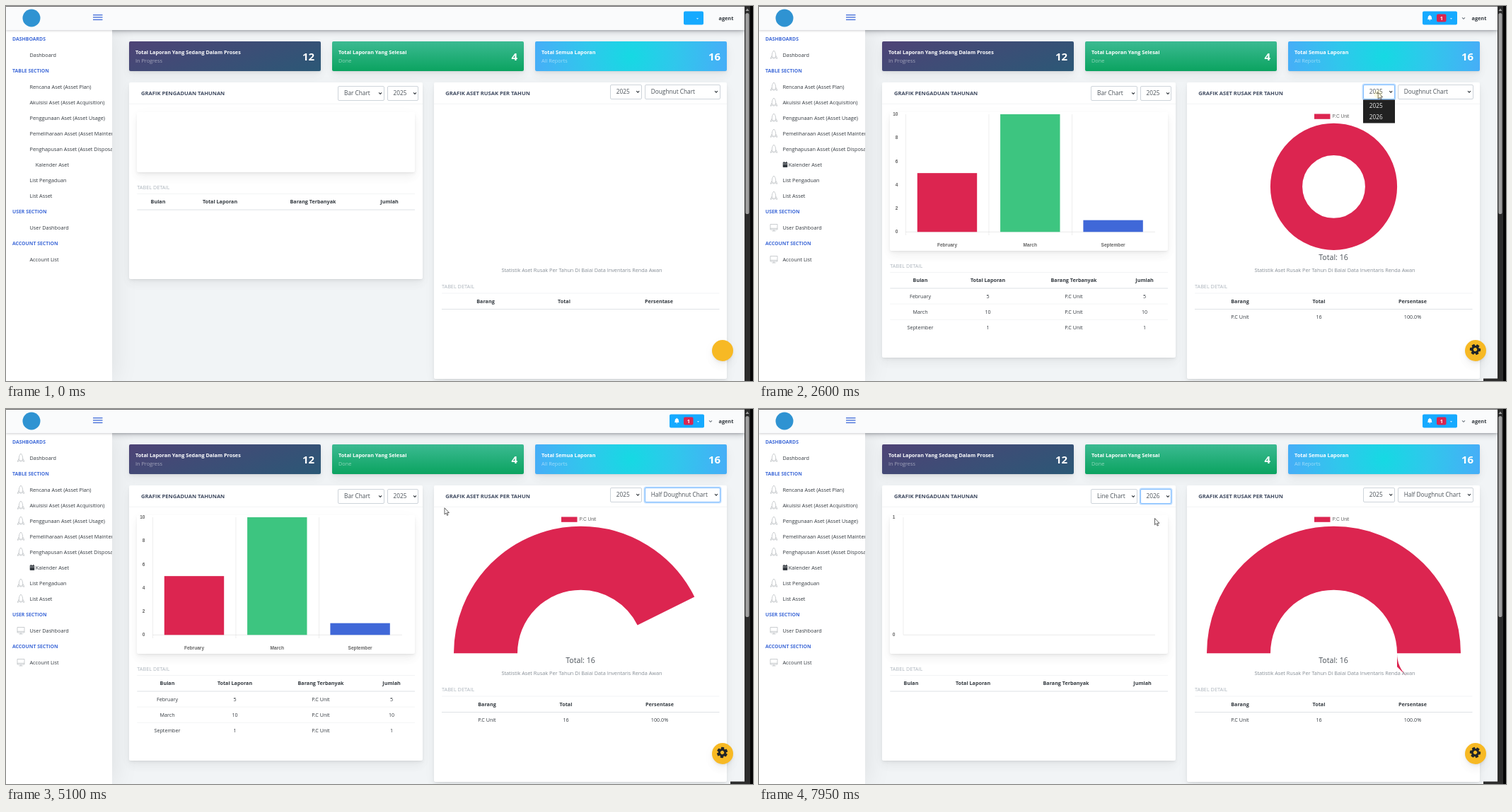
An HTML page that plays this animation: 1056x530 px, repeating every 8000 ms.

```html
<!DOCTYPE html>
<html lang="id">
<head>
<meta charset="utf-8">
<title>Dashboard</title>
<style>
html { font-size: 8.8px; }
html, body { margin: 0; width: 1056px; height: 530px; overflow: hidden; background: #f1f4f6; }
#stage { position: relative; width: 1056px; height: 530px; overflow: hidden; }
#stage div { position: absolute; box-sizing: border-box; }
#stage > svg { position: absolute; left: 0; top: 0; }
.shadow { box-shadow: 0 .47rem 2.19rem rgba(4,9,20,.03), 0 .94rem 1.4rem rgba(4,9,20,.03),
  0 .25rem .53rem rgba(4,9,20,.05), 0 .125rem .19rem rgba(4,9,20,.03); }
.card { background: #fff; border-radius: 2px; }
.select { background: #fff; border: .6px solid #ced4da; border-radius: 2px; }
.focus { border-color: #80bdff; box-shadow: 0 0 0 1.5px rgba(0,123,255,.25); }
text { font: 7.3px 'Open Sans', 'Noto Sans', sans-serif; fill: #343a40; white-space: pre; }
.bold { font-weight: 700; }
.mid { text-anchor: middle; }
.end { text-anchor: end; }
.white { fill: #fff; }
.faint { fill: #fff; opacity: .5; }
.gray { fill: #868e96; }
.pale { fill: #adb5bd; }
.nav { font-size: 6.9px; font-weight: 700; fill: #3f6ad8; }
.title { font-size: 7.6px; font-weight: 700; fill: #3f4a60; }
.cell { font-size: 7.2px; text-anchor: middle; }
.field { font-size: 8.3px; fill: #495057; }
.option { font-size: 8.3px; fill: #eee; }
.number { font-size: 15px; font-weight: 700; fill: #fff; text-anchor: end; }
.total { font-size: 10.6px; fill: #495057; text-anchor: middle; }
.tick, .legend { font: 6.6px 'Liberation Sans', Arial, sans-serif; fill: #666; }
.tick { font-weight: 700; }
</style>
</head>
<body>
<div id="stage"></div>
<script>
const LOOP = 8000, RED = '#dc2550', GREEN = '#3dc580', BLUE = '#4068d8';
const ICONS_AT = 380, LAYOUT_AT = 480, DATA_AT = 650, BADGE_AT = 1850;
const PIE_AT = 3740, HALF_AT = 4720, LINE_AT = 6515, CLEAR_AT = 7810;

// [time, x, y] of the pointer tip
const POINTER = [[1150, 770, 318], [1500, 790, 300], [1740, 815, 265], [1940, 815, 265],
  [2350, 874, 122], [2800, 876, 122], [3000, 945, 122], [3300, 945, 122], [3500, 944, 139],
  [3720, 944, 139], [3950, 943, 121], [4200, 941, 122], [4480, 939, 168], [4660, 939, 168],
  [5240, 566, 135], [5600, 498, 122], [5900, 498, 122], [6150, 499, 155], [6380, 499, 155],
  [6680, 559, 122], [7100, 559, 122], [7350, 559.5, 154.5]];
const TOOLTIP = [[1250, 0], [1500, 1], [1620, 1], [1860, 0], [2020, 0], [2150, .8], [2250, .8], [2500, 0]];
const CLICKS = [2400, 2800, 3060, 3560, 4080, 4560, 5660, 6340, 6940, 7680];
const YEARS = ['2025', '2026'], KINDS = ['Pie Chart', 'Doughnut Chart', 'Half Doughnut Chart'];
// [open, close, x, y, width, options]
const MENUS = [[2420, 2820, 854, 132.5, 45, YEARS], [3080, 3600, 903, 132.5, 107, KINDS],
  [4100, 4600, 903, 132.5, 107, KINDS], [5700, 6380, 469, 134, 65, ['Bar Chart', 'Line Chart']],
  [6960, 7720, 539, 134, 45, YEARS]];
const MONTHS = [['February', 5, RED], ['March', 10, GREEN], ['September', 1, BLUE]];
const BASE = 319.3, UNIT = 16.63;

const clamp = v => Math.max(0, Math.min(1, v));
const easeOut = (t, start) => 1 - (1 - clamp((t - start) / 1000)) ** 4;

function track(keys, t) {
  let i = 0;
  while (i < keys.length - 2 && t >= keys[i + 1][0]) i++;
  const [a, b] = [keys[i], keys[i + 1]];
  const k = clamp((t - a[0]) / (b[0] - a[0])), s = k * k * (3 - 2 * k);
  return a.slice(1).map((v, n) => v + (b[n + 1] - v) * s);
}

const text = (x, y, s, cls = '') => `<text x="${x}" y="${y}" dy=".36em" class="${cls}">${s}</text>`;
const rect = (x, y, w, h, fill, more = '') =>
  `<rect x="${x}" y="${y}" width="${w}" height="${h}" fill="${fill}" ${more}/>`;
const path = (d, stroke, width = 1, fill = 'none', more = '') =>
  `<path d="${d}" stroke="${stroke}" stroke-width="${width}" fill="${fill}" ${more}/>`;
const rule = (x1, x2, y, color = '#e9ecef', width = .6) => path(`M${x1} ${y}H${x2}`, color, width);
const at = (x, y, s) => `<g transform="translate(${x} ${y})">${s}</g>`;
const box = (x, y, w, h, cls, style = '') =>
  `<div class="${cls}" style="left:${x}px;top:${y}px;width:${w}px;height:${h}px;${style}"></div>`;

const ROCKET = path('M0-6C3-3 3 1 2.2 4H-2.2C-3 1-3-3 0-6ZM2.5 1L4.5 4V5.5L2 4M-2.5 1L-4.5 4V5.5L-2 4M0 4V6', '#b5b9bd', .7);
const MONITOR = path('M-5-4.5H5V3H-5ZM-5 1.3H5M-2.5 5H2.5M0 3V5', '#b5b9bd', .7);
const CALENDAR = rect(-3.3, -3, 6.6, 7, '#343a40', 'rx=".7"') + rule(-3.3, 3.3, -.9, '#fff', .6) +
  path('M-1.6-4.2V-2.5M1.6-4.2V-2.5', '#343a40', 1);
const BELL = path('M0-4.2C.5-4.2.6-3.9.6-3.6 2.2-3.2 2.6-2 2.6-.6 2.6 1 3 1.4 3.4 2H-3.4C-3 1.4-2.6 1-2.6-.6-2.6-2-2.2-3.2-.6-3.6-.6-3.9-.5-4.2 0-4.2ZM-1 2.6H1A1 1 0 0 1-1 2.6Z', 'none', 0, '#fff');
const ARROW = path('M0 0V9.2L2.1 7.3 3.6 10.6 5 10 3.6 6.8H6.4Z', '#222', .7, '#fff');
const chevron = (x, y, color = '#343a40') => path(`M${x - 2} ${y - 1}l2 2 2-2`, color, 1.1);

function sidebar(icons) {
  const items = ['Rencana Aset (Asset Plan)', 'Akuisisi Aset (Asset Acquisition)', 'Penggunaan Aset (Asset Usage)',
    'Pemeliharaan Asset (Asset Maintenance)', 'Penghapusan Asset (Asset Disposal)', 'Kalender Aset',
    'List Pengaduan', 'List Asset'];
  const entry = (y, label, icon) => text(33.5, y, label) + (icons ? at(21, y, icon) : '');
  return '<svg width="150" height="530">' +
    text(9, 47, 'DASHBOARDS', 'nav') + entry(69, 'Dashboard', ROCKET) +
    text(9, 92, 'TABLE SECTION', 'nav') +
    items.map((label, i) => {
      const y = 114 + 22 * i;
      return i == 5 ? text(41.8, y, label) + (icons ? at(37, y, CALENDAR) : '') : entry(y, label, ROCKET);
    }).join('') +
    text(9, 291, 'USER SECTION', 'nav') + entry(313, 'User Dashboard', MONITOR) +
    text(9, 336, 'ACCOUNT SECTION', 'nav') + entry(358, 'Account List', MONITOR) + '</svg>';
}

function header(t) {
  const icons = t >= ICONS_AT, badge = t >= BADGE_AT;
  const x = badge ? 938 : icons ? 959 : 958, right = icons ? 987 : 986;
  return '<circle cx="36" cy="17" r="12.5" fill="#2f93d2"/>' +
    [12.7, 16, 19.4].map(y => rule(123, 136.5, y, '#3f6ad8', 1.3)).join('') +
    rect(x, 7.5, right - x, 19, '#16aaff', 'rx="2"') +
    path(`M${right - 10} 17.2h3l-1.5 1.6z`, 'none', 0, '#fff') +
    (icons ? at(x + 10.3, 17, BELL) + chevron(996, 17.3, '#6c757d') : '') +
    (badge ? rect(958, 11.5, 13.5, 11, '#d92550', 'rx="2"') + text(964.8, 17, '1', 'bold mid white') : '') +
    text(1007.5, 17, 'agent', 'bold');
}

const stat = (x, title, sub, count) => text(x + 8.7, 65, title, 'bold white') +
  text(x + 8.7, 77, sub, 'faint') + text(x + 261.8, 71.5, count, 'number');

function table(x1, x2, y, columns, heads, rows) {
  const line = (cells, cy, cls) => cells.map((c, i) => text(columns[i], cy, c, cls)).join('');
  return text(x1, y, 'TABEL DETAIL', 'pale') + rule(x1, x2, y + 9.5) +
    line(heads, y + 20.5, 'cell bold') + rule(x1, x2, y + 32, '#dee2e6', 1.1) +
    rows.map((r, i) => line(r, y + 43 + 22 * i, 'cell') + (i ? rule(x1, x2, y + 32 + 22.1 * i) : '')).join('');
}

function leftChart(t) {
  if (t < DATA_AT) return '';
  const cleared = t >= CLEAR_AT, line = t >= LINE_AT, x0 = cleared ? 204 : 207.5;
  const marks = cleared ? [] : line ? [383, 559.5] : [325, 442.5];
  const ticks = cleared ? [0, 1] : [0, 2, 4, 6, 8, 10];
  let s = path([x0, ...marks].map(x => `M${x} 153V${cleared ? 319 : 324}`).join(''), '#e3e3e3', .6) +
    rule(x0, 560, BASE, '#dcdcdc') +
    ticks.map(v => text(cleared ? 192.5 : 196.5, BASE - .3 - v * (cleared ? 166 : UNIT), v, 'tick end')).join('');
  if (cleared) return s;
  const grow = easeOut(t, line ? LINE_AT : DATA_AT);
  const pts = MONTHS.map(([name, value, color], i) => {
    const x = line ? 207 + 176.2 * i : 266 + 117.3 * i, h = value * UNIT * grow;
    s += text(x, 338, name, 'tick mid');
    if (!line) s += rect(x - 42.2, BASE - h, 84.4, h, color);
    return [x, BASE - h];
  });
  if (!line) return s;
  const [a, b, c] = pts, d1 = Math.hypot(b[0] - a[0], b[1] - a[1]), d2 = Math.hypot(c[0] - b[0], c[1] - b[1]);
  const mix = (p, from, to, k) => p.map((v, i) => v + k * (to[i] - from[i]));
  const before = mix(b, a, c, -.4 * d1 / (d1 + d2)), after = mix(b, a, c, .4 * d2 / (d1 + d2));
  return s + path(`M${a}C${mix(a, a, b, .4)} ${before} ${b}C${after} ${mix(c, b, c, -.4)} ${c}`, RED, 2) +
    pts.map(([x, y]) => `<circle cx="${x}" cy="${y}" r="4.4" fill="${RED}"/>`).join('');
}

function rightChart(t) {
  if (t < DATA_AT) return '';
  const [start, y, r, width, turn, part] = t >= HALF_AT ? [HALF_AT, 345.3, 134.5, 90, 180, .5]
    : t >= PIE_AT ? [PIE_AT, 255.3, 44.8, 89.6, -90, 1] : [DATA_AT, 255.3, 67, 45.2, -90, 1];
  const sweep = part * easeOut(t, start);
  const fade = track(TOOLTIP, t)[0];
  return rect(785, 152.5, 22.5, 7.3, RED) + text(810.5, 156, 'P.C Unit', 'legend') +
    `<circle r="${r}" transform="translate(812.5 ${y}) rotate(${turn})" fill="none" stroke="${RED}"
      stroke-width="${width}" pathLength="1" stroke-dasharray="${sweep} 2"/>` +
    text(812, 355, 'Total: 16', 'total') +
    `<g opacity="${fade}">` + path('M762 316.3H806Q808 316.3 808 318.3L812 322.3 808 326.3Q808 328.5 806 328.5H762Q760 328.5 760 326.5V318.3Q760 316.3 762 316.3Z', 'none', 0, 'rgba(0,0,0,.8)') +
    rect(763.3, 319.2, 6.4, 6.4, RED, 'stroke="#fff" stroke-width=".5"') +
    text(771, 322.4, 'P.C Unit: 16', 'legend white') + '</g>';
}

function menus(t, py) {
  return MENUS.filter(m => t >= m[0] && t < m[1]).map(([open, , x, y, w, options]) =>
    rect(x, y, w, 16.5 * options.length, '#212121') +
    (t < open + 90 ? '' : options.map((o, i) => {
      const top = y + 16.5 * i, over = py >= top && py < top + 16.5;
      return (over ? rect(x, top, w, 16.5, '#444') : '') + text(x + 8.8, top + 8.2, o, 'option');
    }).join(''))).join('');
}

function gear(t) {
  const tooth = a => rect(-2.2, -7.6, 4.4, 15.2, '#212529', `rx=".9" transform="rotate(${a})"`);
  return `<g transform="translate(1012.5 485.5) rotate(${(t - 1740) * .18})">` + [0, 60, 120].map(tooth).join('') +
    '<circle r="5.6" fill="#212529"/><circle r="2.6" fill="#f7b924"/></g>';
}

function pointer(t, [x, y]) {
  if (t < POINTER[0][0]) return '';
  const click = CLICKS.find(c => t >= c && t < c + 220);
  return at(x, y, ARROW) + (click ? `<circle cx="${x}" cy="${y + 2.5}" r="6" fill="#ffdc1e"
    opacity="${.8 * (1 - clamp((t - click - 100) / 120))}"/>` : '');
}

function render(t) {
  const wide = t >= LAYOUT_AT, shift = wide ? 0 : -111, loaded = t >= DATA_AT, leftRows = loaded && t < CLEAR_AT;
  const tip = track(POINTER, t);
  const selects = [
    [469.3, 112.8, 65.3, t < 6380 ? 'Bar Chart' : 'Line Chart', 5760, 6990],
    [538.8, 112.8, 44.7, t < 7735 ? '2025' : '2026', 6990, LOOP],
    [854, 110.5, 44.7, '2025', 2400, 3070],
    [903, 110.5, 106.5, t < 3600 ? KINDS[1] : t < 4600 ? KINDS[0] : KINDS[2], 3070, 5760]];
  const boxes =
    box(0, 0, 1044, 34, 'shadow', 'background:#fafbfc;box-shadow:0 1px 9px rgba(4,9,20,.3)') +
    box(0, 34, 150, 496, '', 'background:#fff;box-shadow:4px 0 33px rgba(0,0,0,.08)') +
    box(0, 0, 1044, 34, '', 'background:#fafbfc;border-top:1px solid #666;box-shadow:0 1px 3px rgba(4,9,20,.2)') +
    box(174.3, 50, 270.7, 41.5, 'card shadow', 'background:linear-gradient(-20deg,#2b5876,#4e4376)') +
    box(461.3, 50, 270.7, 41.5, 'card shadow', 'background:linear-gradient(to top,#0ba360,#3cba92)') +
    box(748.3, 50, 270.7, 41.5, 'card shadow', 'background:radial-gradient(circle 136px,#16d9e3,#30c7ec 47%,#46aef7)') +
    box(174.3, 108, 414.7, 389 + shift, 'card shadow') + box(605, 108, 414, 418.5, 'card shadow') +
    box(185.3, 150, 392.7, 196 + shift, 'card shadow') +
    selects.map(([x, y, w, , on, off]) => box(x, y, w, 21, 'select' + (t >= on && t < off ? ' focus' : ''))).join('') +
    box(997.5, 472, 30, 30, 'shadow', 'background:#f7b924;border-radius:50%');
  const drawing = sidebar(t >= ICONS_AT) + header(t) +
    stat(174.3, 'Total Laporan Yang Sedang Dalam Proses', 'In Progress', 12) +
    stat(461.3, 'Total Laporan Yang Selesai', 'Done', 4) +
    stat(748.3, 'Total Semua Laporan', 'All Reports', 16) +
    text(191, 123.5, 'GRAFIK PENGADUAN TAHUNAN', 'title') + rule(174.3, 589, 138.3) +
    text(621.3, 123.5, 'GRAFIK ASET RUSAK PER TAHUN', 'title') + rule(605, 1019, 138.3) +
    selects.map(([x, y, w, label]) => text(x + 8.7, y + 10.6, label, 'field') + chevron(x + w - 5.5, y + 10.6)).join('') +
    leftChart(t) + rightChart(t) +
    text(814, 373, 'Statistik Aset Rusak Per Tahun Di Balai Data Inventaris Renda Awan', 'mid gray') +
    table(185.3, 578, 367 + shift, leftRows ? [228, 323.5, 445, 545] : [215, 302.5, 434, 542],
      ['Bulan', 'Total Laporan', 'Barang Terbanyak', 'Jumlah'],
      leftRows ? MONTHS.map(([name, n]) => [name, n, 'P.C Unit', n]) : []) +
    table(616, 1008.5, 396.5, loaded ? [680, 791.5, 924] : [678, 789, 923],
      ['Barang', 'Total', 'Persentase'], loaded ? [['P.C Unit', 16, '100.0%']] : []) +
    (t >= ICONS_AT ? gear(t) : '') +
    rect(1044, 0, 8, 530, '#2c2c2c') + rect(1052, 0, 4, 530, '#050505') +
    rect(1045.3, 10, 5.2, 284, '#9f9f9f', 'rx="2.6"') + path('M1045.5 7l2.5-3.5 2.5 3.5z', 'none', 0, '#9f9f9f') +
    (wide ? rect(1024, 526.5, 20, 3.5, '#2c2c2c') : '') +
    menus(t, tip[1]) + pointer(t, tip);
  return boxes + `<svg width="1056" height="530">${drawing}</svg>`;
}

const stage = document.getElementById('stage');
function tick() {
  stage.innerHTML = render(performance.now() % LOOP);
  requestAnimationFrame(tick);
}
tick();
</script>
</body>
</html>
```
